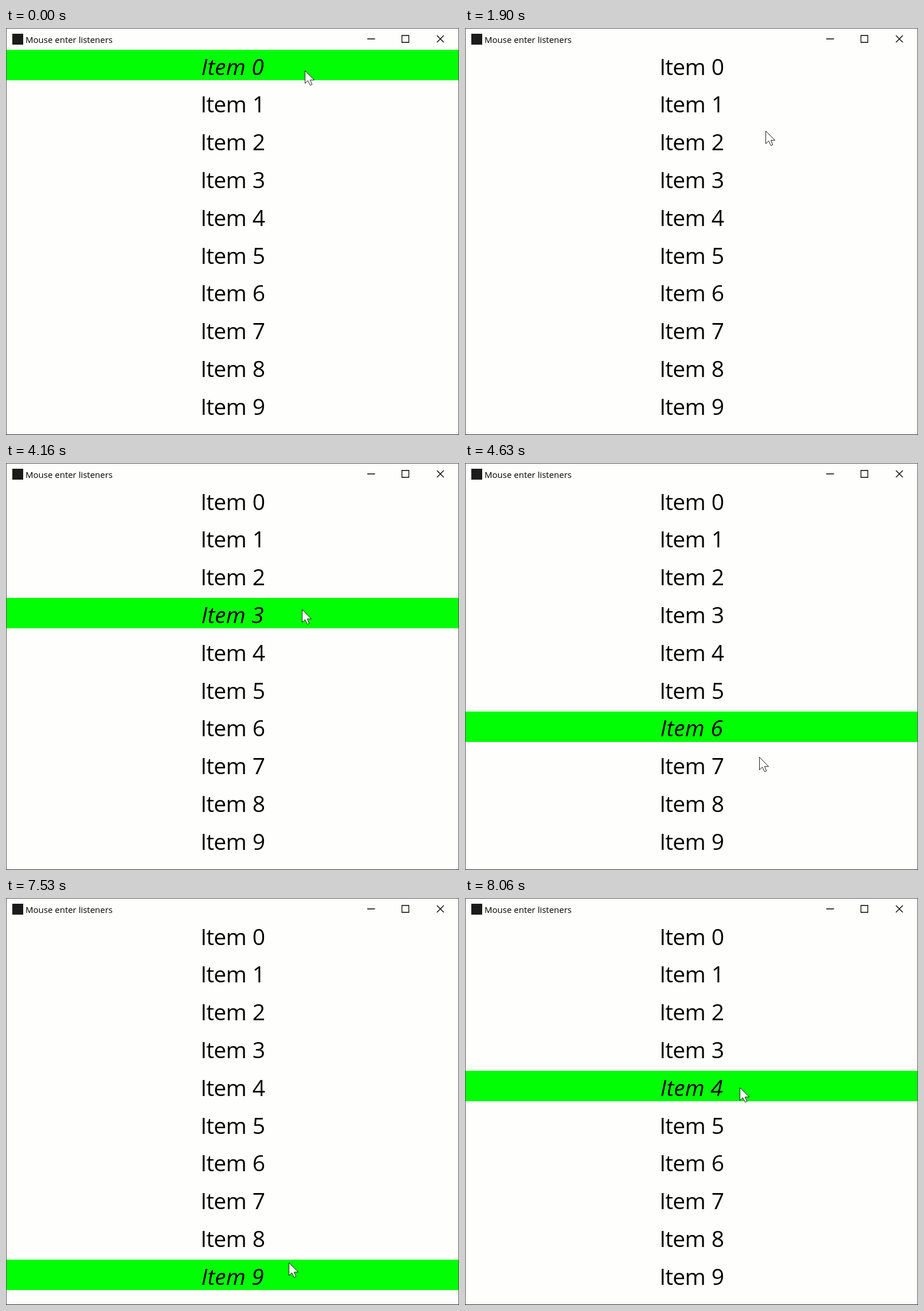
These frames come from a looping animation (790x709 px, 8900 ms). An HTML page:

```html
<!DOCTYPE html>
<html lang="en">
<head>
<meta charset="utf-8">
<title>Mouse enter listeners</title>
<style>
  html, body { margin: 0; width: 100%; height: 100%; overflow: hidden; background: #fefefc; }
  svg { display: block; width: 790px; height: 709px; }
  text { font-family: "Open Sans", "Noto Sans", sans-serif; fill: #000; }
  .title { font-size: 15px; }
  .row rect { fill: none; }
  .row text { font-size: 39px; letter-spacing: -.8px; word-spacing: 1.6px; text-anchor: middle; }
  .row.on rect { fill: #01fe04; }
  .row.on text { font-style: italic; letter-spacing: .2px; word-spacing: 0; }
  .line { fill: none; stroke: #000; stroke-width: 1.3; }
</style>
</head>
<body>
<svg viewBox="0 0 790 709">
  <rect width="790" height="709" fill="#fefefc"/>
  <rect x="11" y="10" width="19" height="19" fill="#1b1b1b"/>
  <text class="title" x="34" y="26">Mouse enter listeners</text>
  <path class="line" d="M630 19H643.5M690.5 13H702.5V25H690.5ZM751.5 13L763.5 25M763.5 13L751.5 25"/>
  <g id="rows"></g>
  <rect x=".5" y=".5" width="789" height="708" fill="none" stroke="#55555b"/>
  <path d="M0 708.5H790" stroke="#2c2c30"/>
  <path id="cursor" d="M0 0V22L5 17.3L9 25.3L12.3 23.9L8.9 16.2H16Z" fill="#fff" stroke="#1c1c1c"/>
</svg>
<script>
const LOOP = 8900, TICK = 100 / 3, LAG = 2 * TICK, PITCH = 65.78;
const HOME = { x: 521, y: 74 };

// mid: share of the time spent on the first half; sharp: 1 is even, higher eases both ends
const MOVES = [
  { from: 800, to: 1100, x: 528, y: 122, mid: .58, sharp: .9 },
  { from: 1567, to: 1960, x: 524, y: 190 },
  { from: 2500, to: 3330, x: 516.5, y: 255, mid: .337, sharp: 1.8 },
  { from: 4130, to: 4800, x: 513.5, y: 527, sharp: 2.6 },
  { from: 5600, to: 6100, x: 509, y: 590 },
  { from: 6100, to: 6330, x: 493.5, y: 642 },
  { from: 7500, to: 8060, x: 479, y: 330, sharp: 1.4 }
];

const rowTop = i => Math.round(38 + PITCH * i);
const rowEnd = i => Math.round(90.88 + PITCH * i);

function add(parent, tag, attrs) {
  const el = document.createElementNS("http://www.w3.org/2000/svg", tag);
  for (const key in attrs) el.setAttribute(key, attrs[key]);
  return parent.appendChild(el);
}

const rows = Array.from({ length: 10 }, (_, i) => {
  const g = add(document.getElementById("rows"), "g", { class: "row" });
  const y = rowTop(i);
  add(g, "rect", { x: 1, y, width: 788, height: rowEnd(i) - y });
  add(g, "text", { x: 395.3, y: 81.7 + PITCH * i }).textContent = "Item " + i;
  return g;
});
const cursor = document.getElementById("cursor");

function ease(u, mid = .5, sharp = 1) {
  const a = (u * (1 - mid)) ** sharp, b = ((1 - u) * mid) ** sharp;
  return a / (a + b);
}

function pointer(t) {
  let { x, y } = HOME;
  for (const m of MOVES) {
    if (t <= m.from) break;
    const s = ease(Math.min(1, (t - m.from) / (m.to - m.from)), m.mid, m.sharp);
    x += (m.x - x) * s;
    y += (m.y - y) * s;
  }
  return { x, y };
}

function draw(now) {
  const t = Math.floor((now % LOOP + 8) / TICK) * TICK;
  const { x, y } = pointer(t);
  cursor.setAttribute("transform", `translate(${Math.floor(x) + .5} ${Math.floor(y) + .5})`);
  const hover = pointer(t - LAG).y;
  rows.forEach((row, i) => row.classList.toggle("on", hover >= rowTop(i) && hover < rowEnd(i)));
}

const start = performance.now();
function loop() {
  draw(performance.now() - start);
  requestAnimationFrame(loop);
}
loop();
</script>
</body>
</html>
```
